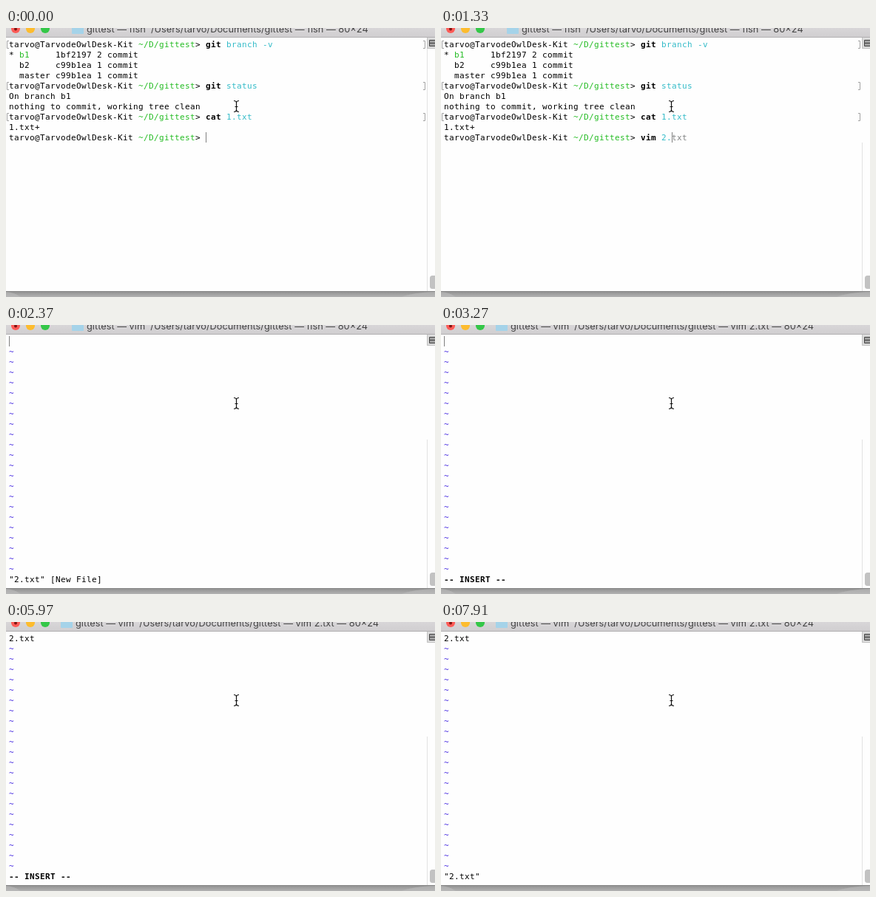
An HTML page that plays this animation: 580 px wide and 364 px high, repeating every 8 s.

```html
<!DOCTYPE html>
<html lang="en">
<head>
<meta charset="utf-8">
<title>Terminal session</title>
<style>
  html, body { margin: 0; height: 100%; overflow: hidden; background: #fff; }
  svg { display: block; width: 580px; height: 364px; }
  text { white-space: pre; }
  .screen {
    font: 11px "DejaVu Sans Mono", monospace;
    letter-spacing: calc(7px - 1ch);
    font-variant-ligatures: none;
  }
  .title { font: 12.8px Inter, sans-serif; fill: #444; }
  .bold { font-weight: bold; }
  .green { fill: #25bc24; }
  .cyan { fill: #33bbc8; }
  .red { fill: #c23621; }
  .blue { fill: #492ee1; }
  .hint { fill: #818383; }
  .mark { fill: none; stroke: #a2a2a2; }
</style>
</head>
<body>
<svg viewBox="0 0 580 364">
  <defs>
    <linearGradient id="bar" x2="0" y2="1">
      <stop stop-color="#d8d6d8"/><stop offset="1" stop-color="#d0ced0"/>
    </linearGradient>
    <linearGradient id="shade" x2="0" y2="1">
      <stop stop-color="#8f8f8f"/><stop offset="1" stop-color="#b2b2b2"/>
    </linearGradient>
  </defs>

  <rect width="580" height="364" fill="#fefefe"/>
  <rect width="580" height="12" fill="url(#bar)"/>
  <rect y="12" width="580" height="1" fill="#b1afb1"/>
  <circle cx="13" cy="1" r="6" fill="#fc5b57"/>
  <circle cx="13" cy="1.5" r="2" fill="#7d1512"/>
  <circle cx="33" cy="1" r="6" fill="#fdbc2e"/>
  <circle cx="53" cy="1" r="6" fill="#34c748"/>
  <g id="heading">
    <path d="M0 0H16V7Q16 8 15 8H1Q0 8 0 7Z" fill="#a5d3e9"/>
    <text id="title" class="title" x="20" y="6"></text>
  </g>

  <g class="screen">
    <g id="shell"></g>
    <g id="editor"></g>
  </g>
  <rect id="caret" width="1" height="14" fill="#808080"/>

  <rect id="track" x="569" width="1" fill="#e2e2e2"/>
  <rect x="573" y="335" width="10" height="18" rx="3.5" fill="#c2c2c2"/>
  <path d="M569 13H580V28H569Z" fill="#dcdcdc"/>
  <path d="M569.5 13V27.5H580" fill="none" stroke="#c0c0c0"/>
  <path d="M573 17H580V24H573Z" fill="#a0a0a0"/>
  <path d="M580 16.5H572.5V24.5H580M573 20.5H580" fill="none" stroke="#444"/>

  <rect y="356" width="580" height="8" fill="url(#shade)"/>
  <path d="M0 357Q12 358 20 364H0ZM580 357Q550 358 535 364H580Z" fill="#bcbcbc" opacity=".6"/>
  <path d="M0 356.5H580" stroke="#858585"/>
  <path d="M308 98.5Q311.5 98.5 311.5 101.5Q311.5 98.5 315 98.5M311.5 101V111M308 113.5Q311.5 113.5 311.5 110.5Q311.5 113.5 315 113.5M309.5 106.5H313.5"
        fill="none" stroke="#111" stroke-width="1.2"/>
</svg>
<script>
const LOOP = 8000, CELL = 7, ROW = 14, LEFT = 4, TOP = 15, PROMPT_COLS = 38;
const EDITOR_START = 2370, ESCAPE = 6560, COMMAND = 7310, SAVED = 7910;
const COMMAND_LINE = 'vim 2.txt', CONTENT = '2.txt';
const PATH = '/Users/tarvo/Documents/gittest';

// Each timeline lists [start in ms, value].
const typed = [[0, 0], [140, 1], [290, 2], [430, 4], [730, 5], [1330, 6], [1480, 7], [1780, 8], [2070, 9]];
const inserted = [[0, 0], [3720, 1], [4320, 2], [4470, 3], [4620, 4], [4920, 5]];
const statuses = [
  [0, '"2.txt" [New File]'], [3270, '-- INSERT --'], [ESCAPE, ''],
  [COMMAND, ':'], [7460, ':w'], [7610, ':wq'], [SAVED, '"2.txt"'],
];
const headings = [
  [0, [89, `gittest — fish  ${PATH} — fish — 80×24`]],
  [EDITOR_START, [89, `gittest — vim  ${PATH} — fish — 80×24`]],
  [2520, [74, `gittest — vim  ${PATH} — vim 2.txt — 80×24`]],
];

const $ = id => document.getElementById(id);
const at = (timeline, t) => timeline.findLast(([start]) => start <= t)[1];
const span = (kind, s) => `<tspan class="${kind}">${s}</tspan>`;
const line = (row, s) => `<text x="${LEFT}" y="${TOP + 11 + row * ROW}">${s}</text>`;
const prompt = (row, s) =>
  line(row, `tarvo@TarvodeOwlDesk-Kit ${span('green', '~/D/gittest')}&gt; ${s}`);
const command = (name, args) => `${span('bold', name)} ${span('cyan', args)}`;
const marks = row => {
  const y = TOP + 2.5 + row * ROW;
  return `<path class="mark" d="M4 ${y}H1.5v10H4M564 ${y}h2.5v10H564"/>`;
};

const history = [
  prompt(0, command('git', 'branch -v')),
  line(1, `* ${span('green', 'b1')}     1bf2197 2 commit`),
  line(2, '  b2     c99b1ea 1 commit'),
  line(3, '  master c99b1ea 1 commit'),
  prompt(4, command('git', 'status')),
  line(5, 'On branch b1'),
  line(6, 'nothing to commit, working tree clean'),
  prompt(7, command('cat', '1.txt')),
  line(8, '1.txt+'),
  ...[0, 4, 7].map(marks),
].join('');
const tildes = Array.from({ length: 22 }, (_, i) => line(i + 1, span('blue', '~'))).join('');

function shellView(count) {
  const name = COMMAND_LINE.slice(0, Math.min(count, 4));
  const args = COMMAND_LINE.slice(4, Math.max(count, 4));
  const hint = count ? COMMAND_LINE.slice(count) : '';
  return history + prompt(9,
    span(count === 1 ? 'bold red' : 'bold', name) + span('cyan', args) + span('hint', hint));
}

function editorView(count, status) {
  const kind = status.startsWith('--') ? 'bold' : '';
  return line(0, CONTENT.slice(0, count)) + tildes + line(23, span(kind, status));
}

function caretCell(t, status) {
  if (t < EDITOR_START) return [PROMPT_COLS + at(typed, t), 9];
  if (t < ESCAPE) return [at(inserted, t), 0];
  return t < COMMAND ? [CONTENT.length - 1, 0] : [status.length, 23];
}

const shown = {};
function setContent(id, html) {
  if (shown[id] !== html) $(id).innerHTML = shown[id] = html;
}

function draw(now) {
  const t = now % LOOP, status = at(statuses, t), inShell = t < EDITOR_START;
  const [headingX, title] = at(headings, t);
  setContent('title', title);
  $('heading').setAttribute('transform', `translate(${headingX})`);
  setContent('shell', inShell ? shellView(at(typed, t)) : '');
  setContent('editor', inShell ? '' : editorView(at(inserted, t), status));

  const [col, row] = caretCell(t, status), caret = $('caret');
  caret.setAttribute('x', LEFT + col * CELL);
  caret.setAttribute('y', TOP + row * ROW);
  const hidden = (t >= 5970 && t < 6420) || t >= SAVED;
  caret.setAttribute('visibility', hidden ? 'hidden' : 'visible');

  const trackTop = t < 140 ? 28 : 155;
  $('track').setAttribute('y', trackTop);
  $('track').setAttribute('height', 356 - trackTop);
}

const begin = performance.now();
function tick() {
  draw(performance.now() - begin);
  requestAnimationFrame(tick);
}
tick();
</script>
</body>
</html>
```
